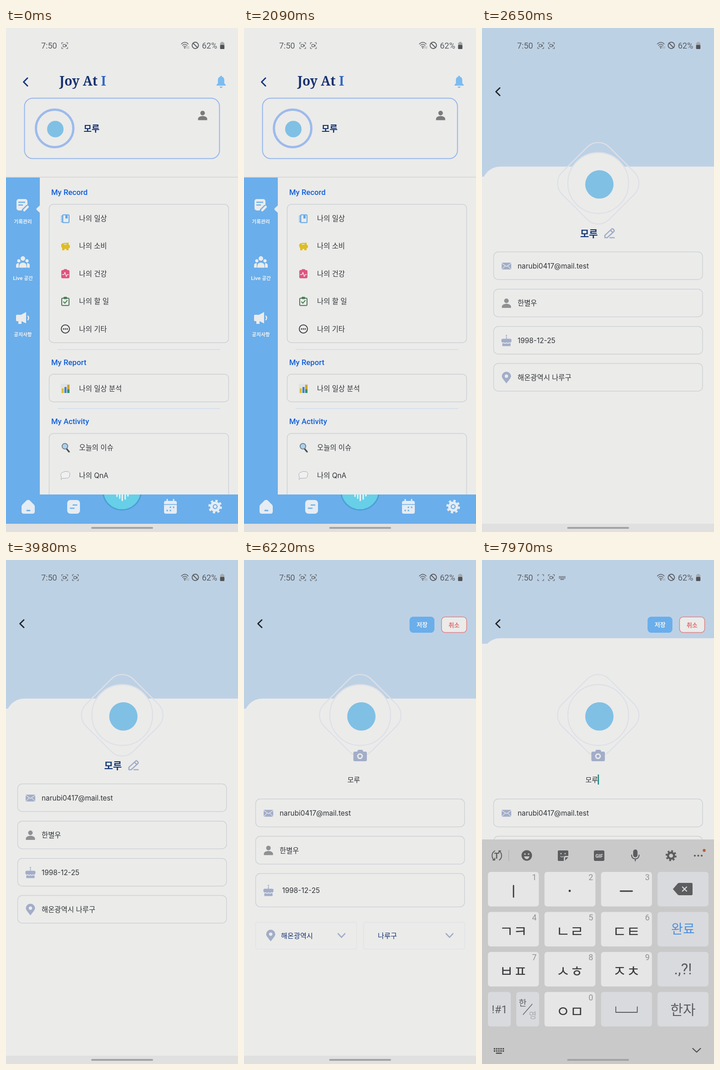
Animation, 508 px wide and 1102 px high, one loop 8000 ms. Source, as an HTML page:

```html
<!DOCTYPE html>
<html lang="ko">
<head>
<meta charset="utf-8">
<style>
html, body { margin: 0; width: 100%; height: 100%; overflow: hidden; background: #ebebea; }
svg { display: block; width: 508px; height: 1102px; }
text { font-family: Inter, 'Noto Sans CJK KR', 'Noto Sans CJK JP', 'Noto Sans CJK', sans-serif; }
.ro { font-family: Roboto, 'Noto Sans CJK KR', sans-serif; }
.mid { text-anchor: middle; }
</style>
</head>
<body>
<svg id="stage" viewBox="0 0 508 1102"></svg>
<script>
const BG = '#ebebea', SKY = '#6aaeeb', NAVY = '#15316f', INK = '#303336', MIST = '#a2adc8', GREY = '#5a5d60', MASCOT = '#80c0e4';

const text = (x, y, size, fill, str, extra = '') => `<text x="${x}" y="${y}" font-size="${size}" fill="${fill}" ${extra}>${str}</text>`;
const rect = (x, y, w, h, r, fill, stroke = 'none', sw = 1.4) =>
  `<rect x="${x}" y="${y}" width="${w}" height="${h}" rx="${r}" fill="${fill}" stroke="${stroke}" stroke-width="${sw}"/>`;
const circle = (x, y, r, fill, stroke = 'none', sw = 1) =>
  `<circle cx="${x}" cy="${y}" r="${r}" fill="${fill}" stroke="${stroke}" stroke-width="${sw}"/>`;
const line = (d, stroke, sw = 2) =>
  `<path d="${d}" fill="none" stroke="${stroke}" stroke-width="${sw}" stroke-linecap="round" stroke-linejoin="round"/>`;
const shape = (d, fill) => `<path d="${d}" fill="${fill}"/>`;
const at = (x, y, body, scale = 1) => `<g transform="translate(${x} ${y}) scale(${scale})">${body}</g>`;
const group = (id, body) => `<g id="${id}">${body}</g>`;
const MID = ' class="mid"', BOLD = ' font-weight="700"', MEDIUM = ' font-weight="500"', RO = ' class="ro"', ROMID = ' class="ro mid"';

// Icons, each centred on its own origin
const person = c => circle(0, -5.5, 5, c) + shape('M-10 10V7C-10 3-4 1 0 1S10 3 10 7V10Z', c);
const gear = (r, c, hole) => circle(0, 0, r * .74, c) +
  `<circle r="${r * .8}" fill="none" stroke="${c}" stroke-width="${r * .4}" stroke-dasharray="${r * Math.PI / 10}"/>` +
  circle(0, 0, r * .36, hole);
const envelope = rect(-10.5, -7.5, 21, 15, 1.5, MIST) + line('M-10-6L0 1L10-6M-10 7L-3 0M10 7L3 0', BG, 1.2);
const cake = rect(-.8, -9, 1.6, 6, 0, MIST) + circle(0, -11, 1.4, MIST) +
  shape('M-11 2V-1Q-11-4-8-4H8Q11-4 11-1V2Q9 6 6 3.500Q3 7 0 3.500Q-3 7-6 3.500Q-9 6-11 2Z', MIST) +
  shape('M-9 6Q-7 6.500-6 5.500Q-3 8.500 0 5.500Q3 8.500 6 5.500Q7 6.500 9 6V12H-9Z', MIST);
const pin = shape('M0 12.500C-5 6-10 1-10-3A10 10 0 0 1 10-3C10 1 5 6 0 12.500Z', MIST) + circle(0, -3.2, 3.7, BG);
const chevron = c => line('M-7.5-4L0 4L7.5-4', c, 2.6);
const pencil = line('M-10 10V5L5-9Q7-10 9-7Q11-5 9-3L-5 10ZM2-6L7-1M1 10H10', MIST, 2.6);
const notebook = rect(-6, -8, 14, 17, 1.5, 'none', '#64a8e6', 2) + rect(0, -7, 5, 7, 0, '#64a8e6') +
  line('M-9-5H-5M-9-1H-5M-9 3H-5M-9 7H-5', '#64a8e6', 1.8);
const piggy = shape('M-9-4Q-5-8 2-7L7-8V-4L10-1V3L7 5V9H2V6H-2V9H-7V4Q-10 1-9-4Z', '#dfbd22') + line('M-3-4H2', BG, 1.5);
const board = (c, fill) => rect(-8, -7, 16, 16, 2, fill, c, 2) + rect(-4, -10, 8, 5, 2, c);
const health = board('#e0557f', '#e0557f') + line('M-7 2H-3L-1-3L2 6L4 2H7', BG, 1.5);
const todo = board('#4a7a52', 'none') + line('M-4 1L-1 4L4-2', '#4a7a52', 2);
const more = circle(0, 0, 9, 'none', INK, 1.8) + [-4, 0, 4].map(x => circle(x, 0, 1.5, INK)).join('');
const chart = rect(-10, -10, 20, 21, 1, '#dfe3e5') + rect(-8, 0, 4.5, 10, 0, '#e3bd2b') + rect(-2, -3, 4.5, 13, 0, '#3a86c8') +
  rect(4, -8, 5, 18, 0, '#cfa42c') + rect(4, 2, 5, 8, 0, '#3f8f6a');
const lens = line('M3 3L8 9', '#4b4f55', 3.5) + circle(-1, -3, 6.2, '#a9d2ee', '#6f7a86', 1.8);
const cloud = 'M-9 3C-12-2-8-7-4-7Q0-10 4-8C9-9 11-3 9 0C10 5 5 7 1 6Q-3 8-6 6L-9 9Z';
const bubble = shape(cloud, '#f0f0f0') + line(cloud, '#a5a8ab', 1);
const keyboard = c => [-6, -3, 0, 3, 6].map(x => rect(x - 1, -3, 2, 2, 0, c) + rect(x - 1, 0, 2, 2, 0, c)).join('') + rect(-4, 3.2, 8, 1.6, 0, c);
const brackets = line('M-6.500-3.500V-6.500H-3.500M3.500-6.500H6.500V-3.500M6.500 3.500V6.500H3.500M-3.500 6.500H-6.500V3.500', GREY, 1.2);
const camcorder = rect(-3.5, -2.7, 5.4, 5.4, 1, 'none', GREY, 1.2) + shape('M2 0L4.500-2.700V2.700Z', GREY);

// Home page
const row = (y, icon, label) => at(130, y, icon) + text(160, y + 5.5, 15.4, INK, label);
const card = (y, h) => rect(94.5, y, 393, h, 9, 'none', '#cccfd1', 1.4);
const heading = (y, s) => text(99, y, 16.7, '#0f5fd8', s, RO + MEDIUM);
const tab = (y, s) => text(37, y, 10.7, '#f0f2f3', s, MID + BOLD);
const rows = [[notebook, '나의 일상'], [piggy, '나의 소비'], [health, '나의 건강'], [todo, '나의 할 일'], [more, '나의 기타']];
const PALE = '#e6ecf2';

const home = rect(0, 0, 508, 1102, 0, BG) +
  line('M47 109.500L38.500 118L47 126.500', '#12357f', 3) +
  `<text x="117" y="126" font-size="28" ${BOLD} fill="${NAVY}" style="font-family:'Noto Serif',serif">Joy At <tspan fill="#2f67c4">I</tspan></text>` +
  shape('M461 126v-2l3-3v-7c0-5 3-7 5-7.500c0-3 4-3 4 0c2 .5 5 2.500 5 7.500v7l3 3v2zM468 128h6a3 3 0 0 1-6 0z', '#7cbcf0') +
  rect(40.5, 153.5, 427, 132, 18, 'none', '#96b7ec', 2) +
  circle(106.5, 219.5, 41, BG, '#9cbaec', 5) + circle(108, 221, 18, MASCOT) +
  text(170, 226.5, 19, NAVY, '모루', BOLD) + at(430.5, 191.5, person('#7b7b7b')) +
  rect(0, 325.5, 508, 1.3, 0, '#d0d0d0') + rect(0, 327, 74, 694, 0, SKY) +
  shape('M75 387L67.500 394Q65.500 396 67.500 398L75 405Z', BG) +
  rect(23, 374, 24, 25, 5, BG) + line('M28 381H41M28 387H36', SKY, 2.4) +
  line('M39 399L47 391', SKY, 9) + line('M40 398.500L47.500 391', BG, 5) + tab(427, '기록관리') +
  [[37, 504, 5], [28, 509, 3.5], [46, 509, 3.5]].map(a => circle(...a, BG)).join('') +
  shape('M29 524V520Q30 513 37 513T45 520V524ZM22 524V518Q23 514 28 514V524ZM52 524V518Q51 514 46 514V524Z', BG) + tab(551, 'Live 공간') +
  shape('M22 629Q22 627 24 627H33L44 621V646L34 641V647H27V641H24Q22 641 22 639Z', BG) + line('M48 630Q51 634 48 638', BG, 2.6) + tab(674, '공지사항') +
  heading(365, 'My Record') + card(385.5, 302.5) + rows.map((r, i) => row(416.5 + i * 60.4, ...r)).join('') +
  rect(113, 702.3, 356, 1.5, 0, '#cfdcec') +
  heading(736.5, 'My Report') + card(757, 60.5) + row(788, chart, '나의 일상 분석') +
  rect(113, 831.3, 356, 1.5, 0, '#cfdcec') +
  heading(866, 'My Activity') + card(886.5, 200) + row(917.5, lens, '오늘의 이슈') + row(978, bubble, '나의 QnA') +
  rect(0, 1020, 508, 82, 0, SKY) +
  `<clipPath id="below"><rect y="1020" width="508" height="60"/></clipPath><g clip-path="url(#below)">` +
  circle(254, 1012, 41.8, '#67cfe8', '#4c9fd6', 3) +
  [[243, 1024], [249, 1028], [254.5, 1033], [261, 1030], [267, 1023]].map(([x, y]) => line(`M${x} 1000V${y}`, '#e8f3f5', 3)).join('') + '</g>' +
  shape('M34 1046Q34 1043 37 1041L45 1033Q48.500 1030.500 52 1033L60 1041Q63 1043 63 1046V1057Q63 1062 58 1062H39Q34 1062 34 1057Z', PALE) +
  line('M46 1055H52', SKY, 3) +
  rect(134, 1032, 28, 30, 7, PALE) + line('M147 1043H155M141 1050H149', SKY, 2.6) +
  rect(346, 1034, 28, 28, 4, PALE) + line('M353 1031V1035M367 1031V1035', PALE, 3) + rect(346, 1041, 28, 1.5, 0, SKY) +
  [[360, 1048], [367, 1048], [353, 1055], [360, 1055]].map(a => circle(...a, 1.8, SKY)).join('') +
  at(458, 1046.5, gear(15, PALE, SKY) + circle(0, 0, 3.2, PALE));

// Profile page, read-only and editing
const field = (y, h, icon, label, x = 78) => rect(25.5, y, 457.5, h, 10, 'none', '#cdd1d3') +
  at(53.5, y + h / 2 + .7, icon) + text(x, y + h / 2 + 6, 15.4, INK, label);
const select = (x, label, labelX) => rect(x, 792, 221, 58.5, 3, 'none', '#dfe3e6') +
  text(labelX, 826.5, 15.2, NAVY, label, MEDIUM) + at(x + 188, 821, chevron(MIST));
const contact = [envelope, 'narubi0417@mail.test'], owner = [person('#8f9193'), '한별우'];

const profile = rect(0, 0, 508, 1102, 0, BG) + `<rect id="header" width="508" fill="#bdd1e5"/>` +
  group('sheet', shape('M0 40A40 40 0 0 1 40 0H508V1102H0Z', BG)) +
  line('M39 131L30.500 139.300L39 147.600', '#202429', 2.8) +
  `<g transform="rotate(45 254.500 339.500)">${rect(181.5, 266.5, 146, 146, 34, 'none', '#dde0e7', 2.4)}</g>` +
  circle(254.5, 339, 66.5, BG, '#dde0e7', 2.4) + circle(257, 342, 31, MASCOT) +
  group('view', text(215, 456.5, 21, '#163a78', '모루', BOLD) + at(279.3, 448.3, pencil, 1.02) +
    field(489.5, 60.5, ...contact) + field(571, 60.5, ...owner) + field(652.5, 60.5, cake, '1998-12-25') +
    field(733.5, 60.5, pin, '해온광역시 나루구')) +
  group('edit', rect(362.5, 124, 54.5, 35, 8, SKY) + text(389.9, 146, 13, '#f0f2f3', '저장', MID + BOLD) +
    rect(432.5, 124.5, 55, 34, 8, BG, '#e08080', 1.5) + text(460, 146.5, 13, '#dd7070', '취소', MID + BOLD) +
    rect(239.5, 419, 29.5, 21, 3, MIST) + shape('M247 420L250 415H259L262 420Z', MIST) + circle(254, 429, 4.8, 'none', BG, 3) +
    text(226.5, 485.5, 15, INK, '모루') +
    field(522.5, 61, ...contact) + field(604, 61, ...owner) + field(685.5, 73, cake, '1998-12-25', 83.5) +
    select(25.5, '해온광역시', 81) + at(58.5, 821.3, pin) + select(262, '나루구', 293)) +
  group('caret', rect(253.5, 469, 2.6, 22, 0, '#168a80'));

// On-screen keyboard
const PANEL = '#c9c9c9', KEY = '#e6e6e6', ALT = '#d8dade', TOOL = '#5c5d5f', LETTER = '#3a3b3d';
const colX = c => 13 + c * 123.8, rowY = r => 682 + r * 87.5;
const key = (c, r, fill = KEY) => rect(colX(c), rowY(r), 111.5, 75.5, 6, fill);
const label = (c, r, s, size, fill, dy = 49, extra = ROMID) => text(colX(c) + 55.7, rowY(r) + dy, size, fill, s, extra);
const digit = (c, r, s) => text(colX(c) + 106.5, rowY(r) + 18, 18, '#929292', s, RO + ' text-anchor="end"');
const jamo = [['', '', ''], ['ㄱㅋ', 'ㄴㄹ', 'ㄷㅌ'], ['ㅂㅍ', 'ㅅㅎ', 'ㅈㅊ']];

let keys = rect(0, 611, 508, 491, 0, PANEL);
jamo.forEach((set, r) => set.forEach((s, c) => {
  keys += key(c, r) + label(c, r, s, 33, LETTER, 54, MID + MEDIUM) + digit(c, r, r * 3 + c + 1);
}));
keys += line('M69 712V737', LETTER, 2.8) + circle(192, 723.5, 2.4, LETTER) + line('M303 724H329', LETTER, 2.8) +
  [0, 1, 2, 3].map(r => key(3, r, ALT)).join('') +
  shape('M418 719.500L428 708Q429 706 432 706H459Q461 706 461 709V730Q461 733 459 733H432Q429 733 428 731Z', TOOL) +
  line('M439 715L448 724M448 715L439 724', ALT, 2.4) +
  label(3, 1, '완료', 28, '#4a8fdd', 47) + label(3, 2, '.,?!', 33, TOOL) + label(3, 3, '한자', 30, TOOL) +
  rect(13, 944.5, 50, 75.5, 6, ALT) + text(38.5, 991, 24, TOOL, '!#1', ROMID) +
  rect(75, 944.5, 50, 75.5, 6, ALT) + text(80.5, 975, 18.5, TOOL, '한') + line('M90 994L110 971', TOOL, 1.3) + text(102.5, 1001.5, 18.5, '#aaaaab', '영') +
  key(1, 3) + label(1, 3, 'ㅇㅁ', 33, LETTER, 54, MID + MEDIUM) + digit(1, 3, 0) +
  key(2, 3, ALT) + line('M293 977V989H340V977', TOOL, 1.8) +
  line('M28 636A12 12 0 0 0 27 656M37 636A12 12 0 0 1 38 656M24 656H28V652M41 636H37V640', TOOL, 2) + text(32, 653, 18, TOOL, 'T', ROMID + BOLD) +
  rect(58, 634, 1.2, 24, 0, '#adadad') +
  circle(98, 646, 11.5, TOOL) + circle(94, 643, 1.7, PANEL) + circle(102, 643, 1.7, PANEL) + shape('M92 648H104Q102 654 98 654T92 648Z', PANEL) +
  shape('M168 635H187Q189 635 189 637V647H183Q179 647 179 651V658H168Q166 658 166 656V637Q166 635 168 635ZM182 657V652Q182 650 184 650H189Z', TOOL) +
  circle(173, 642, 1.5, PANEL) + circle(182, 642, 1.5, PANEL) + line('M172 648Q175 651 178 648', PANEL, 1.5) +
  rect(245, 635, 23, 23, 3, TOOL) + text(256.5, 650.5, 11, '#dcdcdc', 'GIF', ROMID + BOLD) +
  rect(331, 633, 9.5, 17, 4.7, TOOL) + line('M327.500 645Q328 653.500 335.700 653.500T344 645M335.700 654V658', TOOL, 2.2) +
  at(414, 646.5, gear(12, TOOL, PANEL)) +
  [466, 473.5, 481].map(x => circle(x, 646.5, 2.1, TOOL)).join('') + circle(486.5, 635, 3.2, '#b5623a');

// System bars
const status = text(77, 45, 18, GREY, '7:50', RO) + at(128.5, 38.5, brackets + group('blink', camcorder)) +
  group('second', at(152, 38.5, brackets + camcorder)) + group('typing', at(175.5, 38.5, keyboard(GREY))) +
  line('M384 35Q391.500 27.500 399 35M386.500 38Q391.500 33 396.500 38M389 41Q391.500 38.500 394 41', GREY, 1.6) + circle(391.5, 43.5, 1.4, GREY) +
  line('M396.500 40V45M400 45V40', '#9a9da0', 1.2) +
  circle(414.5, 38, 7, 'none', GREY, 1.9) + line('M409.500 33L419.500 43', GREY, 1.9) +
  text(429, 45, 18, GREY, '62%', RO) + rect(471, 30.5, 5, 2, 0, '#a6a9ab') + rect(468.8, 32, 9.4, 14, 1.5, '#a6a9ab') + rect(468.8, 37, 9.4, 9, 1.5, '#505356');

const stage = document.getElementById('stage');
stage.innerHTML = group('home', home) + group('profile', profile) + rect(0, 1084, 508, 18, 0, '#e0e0e0') +
  group('gap', rect(0, 611, 508, 491, 0, '#e6e6e6')) + group('keys', keys) +
  group('navKeys', at(37, 1072, keyboard('#4c4d4f'), 1.6) + at(470, 1072, line('M-8.500-4L0 4L8.500-4', '#4c4d4f', 2.2))) +
  rect(186.5, 1091, 135.5, 4, 2, '#a3a3a3') + status;

const node = id => document.getElementById(id);
const show = (id, on) => node(id).style.display = on ? '' : 'none';
const zoom = (id, s) => node(id).setAttribute('transform', `translate(254 542) scale(${s}) translate(-254 -542)`);
const progress = (t, start, length) => Math.min(1, Math.max(0, (t - start) / length));

function draw(now) {
  const t = now % 8000;
  const page = progress(t, 2120, 310), settle = 1 - (1 - page) ** 5;
  zoom('home', 1 + .152 * settle);
  zoom('profile', .85 + .15 * settle);
  node('profile').setAttribute('opacity', page);
  show('home', page < 1);
  show('profile', page > 0);

  const editing = t >= 5500, typing = t >= 6990;
  show('view', !editing);
  show('edit', editing);
  show('caret', t >= 6940 && (t - 6940) % 1000 < 500);

  const height = typing ? 611 : 1084;
  node('header').setAttribute('height', Math.floor(.3 * height));
  node('sheet').setAttribute('transform', `translate(0 ${Math.floor(.28 * height)})`);

  const rise = progress(t, 6990, 210);
  node('keys').setAttribute('opacity', rise);
  node('keys').setAttribute('transform', `translate(0 ${491 * (1 - rise) ** 4})`);
  show('gap', typing);
  show('keys', typing);
  show('navKeys', typing);

  const beat = t % 1400;
  show('blink', beat < 720 || beat > 1130);
  show('second', t >= 600);
  show('typing', t >= 7640);
  requestAnimationFrame(() => draw(performance.now()));
}
draw(performance.now());
</script>
</body>
</html>
```
